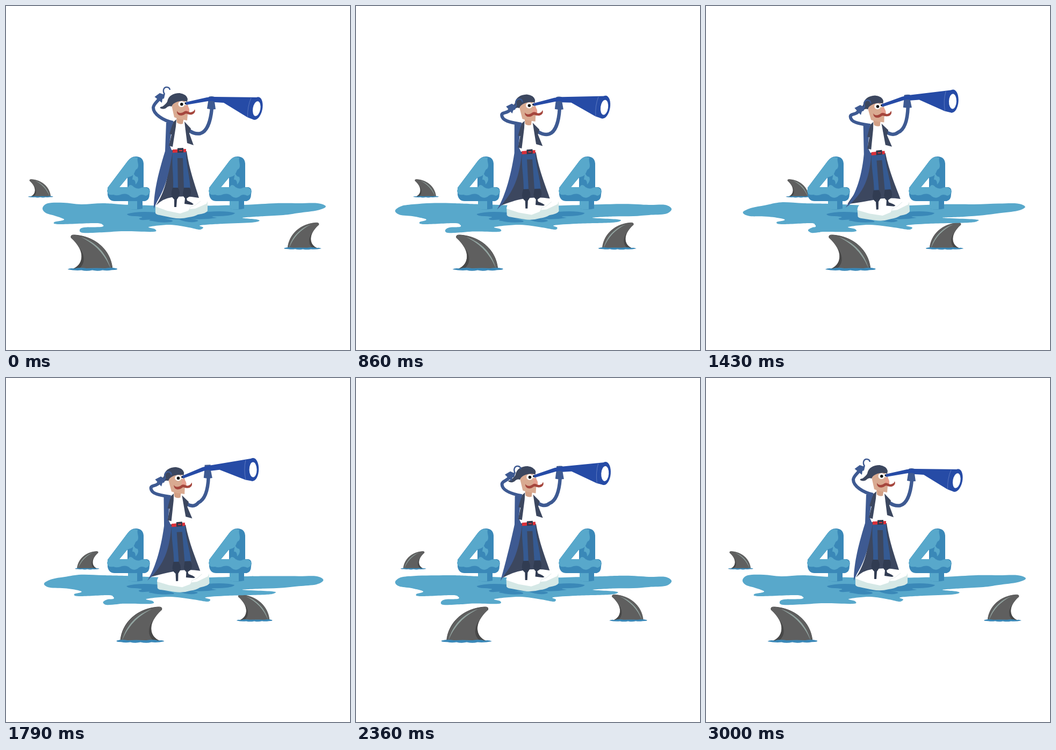
Recreate the animation shown at these times as an HTML page with a canvas. Size 640 by 640 pixels, loop 3.07 s.

```html
<!DOCTYPE html>
<html>
<head>
<meta charset="utf-8">
<style>
html, body { margin: 0; width: 100%; height: 100%; overflow: hidden; background: #fff }
canvas { display: block; width: 100vw; height: 100vh }
</style>
</head>
<body>
<canvas id="stage" width="640" height="640"></canvas>
<script>
const c = document.getElementById('stage').getContext('2d');
const LOOP = 3070, STEP = 3000 / 42;
const LIGHT = '#58a8cb', DEEP = '#3a88b8', COAT = '#3e5a92', DARK = '#3c475f',
      PANTS = '#355a92', BOOT = '#313c52', SCOPE = '#264ba6', SKIN = '#d9aa91', HAIR = '#a5463d';

// piecewise linear track: time, value, time, value...
function track(t, ...k) {
  let i = 0;
  while (i < k.length - 4 && t > k[i + 2]) i += 2;
  const u = Math.max(0, Math.min(1, (t - k[i]) / (k[i + 2] - k[i])));
  return k[i + 1] + (k[i + 3] - k[i + 1]) * u;
}

function fill(color, d, rule) {
  c.fillStyle = color;
  c.fill(new Path2D(d), rule || 'nonzero');
}

function line(color, width, d) {
  c.strokeStyle = color;
  c.lineWidth = width;
  c.stroke(new Path2D(d));
}

function oval(color, x, y, rx, ry, turn = 0) {
  c.fillStyle = color;
  c.beginPath();
  c.ellipse(x, y, rx, ry, turn, 0, 7);
  c.fill();
}

function group(draw) {
  c.save();
  draw();
  c.restore();
}

function spin(deg, x, y) {
  c.translate(x, y);
  c.rotate(deg * Math.PI / 180);
  c.translate(-x, -y);
}

// closed smooth curve through the points
function blob(color, pts) {
  const n = pts.length, at = i => pts[(i + n) % n];
  c.fillStyle = color;
  c.beginPath();
  c.moveTo(...pts[0]);
  for (let i = 0; i < n; i++) {
    const [a, b, d, e] = [at(i - 1), at(i), at(i + 1), at(i + 2)];
    c.bezierCurveTo(b[0] + (d[0] - a[0]) / 6, b[1] + (d[1] - a[1]) / 6,
      d[0] - (e[0] - b[0]) / 6, d[1] - (e[1] - b[1]) / 6, d[0], d[1]);
  }
  c.fill();
}

function shark(x, y, size, face, t) {
  const w = 2 * Math.sin(t / 240);
  group(() => {
    c.translate(x, y);
    c.scale(size * face, size);
    fill('#5f5f5f', 'M-38 -57Q-41 -64 -31 -63C6 -60 35 -36 38.5 0H-35C-14 -9 -12 -33 -38 -57Z');
    fill('#484848', 'M-22 -38C-13 -26 -11 -10 -24 0H-35C-18 -7 -16 -24 -22 -38Z');
    fill('#93a5a1', 'M-20 -59C8 -50 28 -28 35 -1C24 -27 7 -46 -20 -59Z');
    line('#4b4b4b', 1, 'M-38 -57Q-41 -64 -31 -63C6 -60 35 -36 38.5 0');
    fill(DEEP, `M${-45 + w} 1Q-41 -2 -32 -.5Q-22 -3 -10 -1Q10 -2 25 -1Q36 -3 ${47 - w} -.5
      Q${50 - w} 2 37 2.2Q29 4 20 2.4Q11 5 1 2.6Q-10 5 -19 2.6Q-30 4 ${-45 + w} 1Z`);
  });
}

function water(p) {
  const b = Math.sin(Math.PI * p);
  blob(LIGHT, [
    [68 + 5 * b, 376 + 8 * p], [78 + 7 * p + 3 * b, 367 + 9 * p], [107 + 3 * p, 366 + 5 * p],
    [140, 369 - 4 * p], [182, 367], [232, 370 - 2 * p], [330, 372], [440, 370 - p],
    [502 - 4 * p, 367 + 2 * p], [545, 367 + 3 * b], [580 - 5 * b, 367 + 3 * b],
    [595 - 8 * b, 373 + 5 * b], [580 - 4 * b, 380 + 7 * b], [545, 385 + 4 * b],
    [516, 389 + 2 * b], [480, 391 + p], [440, 394], [466 + 36 * p, 397], [471 + 36 * p, 400],
    [455 + 35 * p, 403], [405 + 10 * p, 405], [362 + 12 * p, 408],
    [367 - 3 * b + 18 * p, 412], [360 + 18 * p, 416], [340 + 10 * p, 412], [305, 407],
    [266 - 8 * b, 411], [277 - 10 * b + 2 * p, 415], [274 - 10 * b + 2 * p, 420],
    [220, 419 + p], [182 + 30 * p, 421], [144 + 56 * p - 5 * b, 422],
    [137 + 56 * p - 3 * b, 417], [145 + 56 * p - 3 * b, 412], [177 + 28 * p, 411],
    [180 + 24 * p, 407], [165 + 30 * p, 404], [98 + 44 * p + 3 * b, 406],
    [90 + 43 * p + 4 * b, 402], [105 + 42 * p, 399], [107 + 38 * p, 396],
    [90 + 28 * p, 390 + 2 * p], [74 + 6 * p + 4 * b, 385 + 6 * p]
  ]);
  group(() => {
    c.translate(-p, 0);
    fill(DEEP, `M225 387Q244 381 280 384L375 383Q408 380 426 385Q424 390 397 391Q372 391 393 394
      Q370 398 343 396Q368 399 350 402Q334 403 322 397L295 396Q318 399 ${306 + 8 * p} 402
      Q288 404 272 400Q262 399 270 397Q245 400 248 395Q262 392 240 391Q226 391 225 387Z`);
  });
}

function four(dx) {
  group(() => {
    c.translate(dx, 0);
    fill(DEEP, `M189 338V351Q191 363 202 363H227V377Q240 380 254 377V363H259Q267 361 267 350
      Q270 339 262 337H256V293Q255 281 243 280Q233 279 226 289Z M211 337L226 319V337Z`, 'evenodd');
    fill(LIGHT, 'M227 363H244V378Q234 379 227 377Z');
    fill(LIGHT, `M190 337L226 289Q235 278 245 282C243 289 249 297 244 303C239 304 240 315 232 317
      L226 319L211 337H227Q231 329 238 337Q246 342 252 338Q263 335 267 343Q268 351 260 353
      Q252 349 247 353Q239 360 231 354Q226 348 216 350Q207 354 200 351Q189 353 188 344Z`);
    fill(LIGHT, 'M237 310Q239 317 245 318Q248 325 241 332Q241 322 235 323Z');
  });
}

function ice() {
  fill('#d5e8e6', 'M278 371V385Q279 388 286 389Q300 392 310 394Q325 397 340 393Q350 392 357 388Q373 386 375 381V363Z');
  fill('#fff', `M278 373Q278 363 292 359Q320 353 345 355Q372 357 375 363L373 368L352 377L341 378
    L339 381L324 386L300 381Z`);
  line('#e3eceb', 1, 'M341 379L343 374L352 371L362 363');
}

function body(t) {
  const hx = track(t, 0, 0, 430, -8, 860, -15, 1430, -19, 2140, -11, 2570, -5, 3000, 0);
  const hy = track(t, 0, 0, 430, -2, 860, -3, 1430, -10, 2140, -3, 2570, -2, 3000, 0);
  const x = 275 + hx, y = 377 + hy;
  // coat lining, trousers and legs
  fill(DARK, `M307 268L336 270C341 305 352 334 359 357Q334 352 308 356Q292 358 ${x + 4} ${y - 6}
    C${x + 20} ${y - 30} 302 320 307 268Z`);
  fill(PANTS, 'M310 272H335C335 295 342 318 343 340H331L329 283H319L320 340H311C312 315 308 295 310 272Z');
  fill(BOOT, 'M310 338H320Q325 347 322 354L318 360L317 374H313L313 360Q306 354 308 346Z');
  fill(BOOT, 'M331 338H342Q346 348 342 354L336 358L337 362Q347 366 349 369L346 370L332 368L333 358Q327 352 330 344Z');
  fill('#fff', 'M314 217H332L337 266L310 268Z');
  // coat
  fill(COAT, `M298 217L311 214L304 258L310 272C304 305 299 335 ${x + 6} ${y - 13 - hx * .5}L${x} ${y}
    C${x - hx * .9} ${y - 27 - hx * .5} ${281 - hx * .4} 318 296 270Z`);
  fill(DARK, 'M311 216L317 211L316 224L310 262L303 260L308 239L304 238Z');
  // belt
  fill('#d9303a', 'M310 267L335 266V272L310 273Z');
  fill('#30384c', 'M319 264.5L330 264V272.5L319 273Z');
  fill('#d9303a', 'M322 268H328V270H322Z');
}

function head(k) {
  fill('#d3a085', 'M317 206H331L329 219Q323 221 318 217Z');
  fill(SKIN, 'M308 184L313 207L322 210L337 213L338 202Q344 196 339 187L337 175H318Z');
  fill('#e6a08f', 'M335 184Q342 189 341 196Q336 200 332 195Z');
  fill(DARK, `M300 188Q294 194 287 190Q285 188 291 187Q298 182 300 178C302 167 311 162 323 162
    Q336 164 338 173L337 178Q328 175 319 178Q310 181 308 187Q304 185 300 188Z`);
  const d = Math.min(Math.abs(k - 6.5), Math.abs(k - 35.5));
  const open = d < 1 ? .45 : d < 2 ? .8 : 1;
  oval('#fff', 326.5, 182.5, 6, 5.5 * open);
  oval('#fff', 334.5, 181, 3.2, 3.6 * open);
  oval('#111', 326.8, 182.8, 2.8, 2.8 * open);
  oval('#111', 334.5, 181, 2, 2 * open);
  fill(HAIR, `M318 195C320 200 327 200 332 196C338 193 341 200 346 197Q350 196 351 192
    C354 198 348 203 342 202C338 202 336 199 333 201C327 206 317 204 318 195Z`);
}

function scopeArm(t) {
  const tilt = track(t, 0, 0, 860, 0, 1430, -4.2, 1750, -7.4, 2140, -7.5, 2570, -2.3, 3000, 0);
  const lift = tilt * .85;
  line(COAT, 6.5, `M336 227C344 236 354 239 362 ${237 + lift * 1.1}
    C375 ${233 + lift * 1.3} 381 ${212 + lift} 383 ${190 + lift}`);
  fill(DARK, 'M332 215L344 228L341 237L349 259L337 255Z');
  group(() => {
    c.translate(0, lift);
    fill(COAT, `M377 ${169 + lift * .3}Q382 167 388 ${169 + lift * .3}L388 178H376Z`);
  });
  group(() => {
    spin(tilt, 335, 181);
    fill(SCOPE, 'M334 179L374 170L388 169L470 170L462 212L449 207L405 180L388 179L376 177L335 184Z');
    oval(SCOPE, 466, 190.5, 11, 21.5, .2);
    oval('#fff', 466.3, 191, 7, 14, .17);
    line('#6f89c8', .7, 'M456 171Q449 187 449.5 207');
  });
  group(() => {
    c.translate(0, lift);
    fill(COAT, 'M376 178Q382 175 388 178L390 192Q382 193 374 191Z');
  });
}

function hookArm(t) {
  const q = track(t, 0, 0, 430, .4, 860, 1, 2140, 1, 2570, .13, 3000, 0);
  const x = 6.5 * q, y = 16 * q;
  line(COAT, 6, `M311 217C292 213 ${274 + q} ${201 + 9 * q} ${274 + q} ${189 + 10 * q}
    C${274 + q} ${184 + 9 * q} ${279 + x} ${180 + y} ${284 + x} ${174 + y}`);
  group(() => {
    c.translate(x, y);
    spin(12 * q, 286, 171);
    fill(COAT, 'M276.5 169L286 162L292 164L296 163L294 172L291 173L290 180Z');
    line(COAT, 2.5, 'M295 164C291 158 293 151 299 151Q304 151 305 156');
  });
}

function draw(now) {
  const k = Math.floor(now % LOOP / STEP + .05), t = k * STEP;
  const back = k >= 21 && k < 42, p = 1 - Math.abs(t - 1500) / 1500;
  c.clearRect(0, 0, 640, 640);
  c.lineCap = 'butt';
  c.lineJoin = 'round';
  const swim = track(t, 0, 0, 860, 66, 1430, 108, 1500, 113, 2140, 65.5, 2570, 30, 2929, 1, 3000, 0);
  const face = back ? -1 : 1;
  shark(63.5 + swim - (back ? 3.5 : 0), 354.5, .506, face, t);
  shark(159.5 + swim, 489, 1, face, t);
  shark(553 - swim, 450.5, .75, -face, t);
  water(p);
  four(0);
  four(189);
  group(() => {
    c.translate(4 * p, 4 * p);
    spin(-3.5 * p, 327, 375);
    ice();
    body(t);
    head(k);
    scopeArm(t);
    hookArm(t);
  });
}

const start = performance.now();
function loop() {
  draw(performance.now() - start);
  requestAnimationFrame(loop);
}
loop();
</script>
</body>
</html>
```
